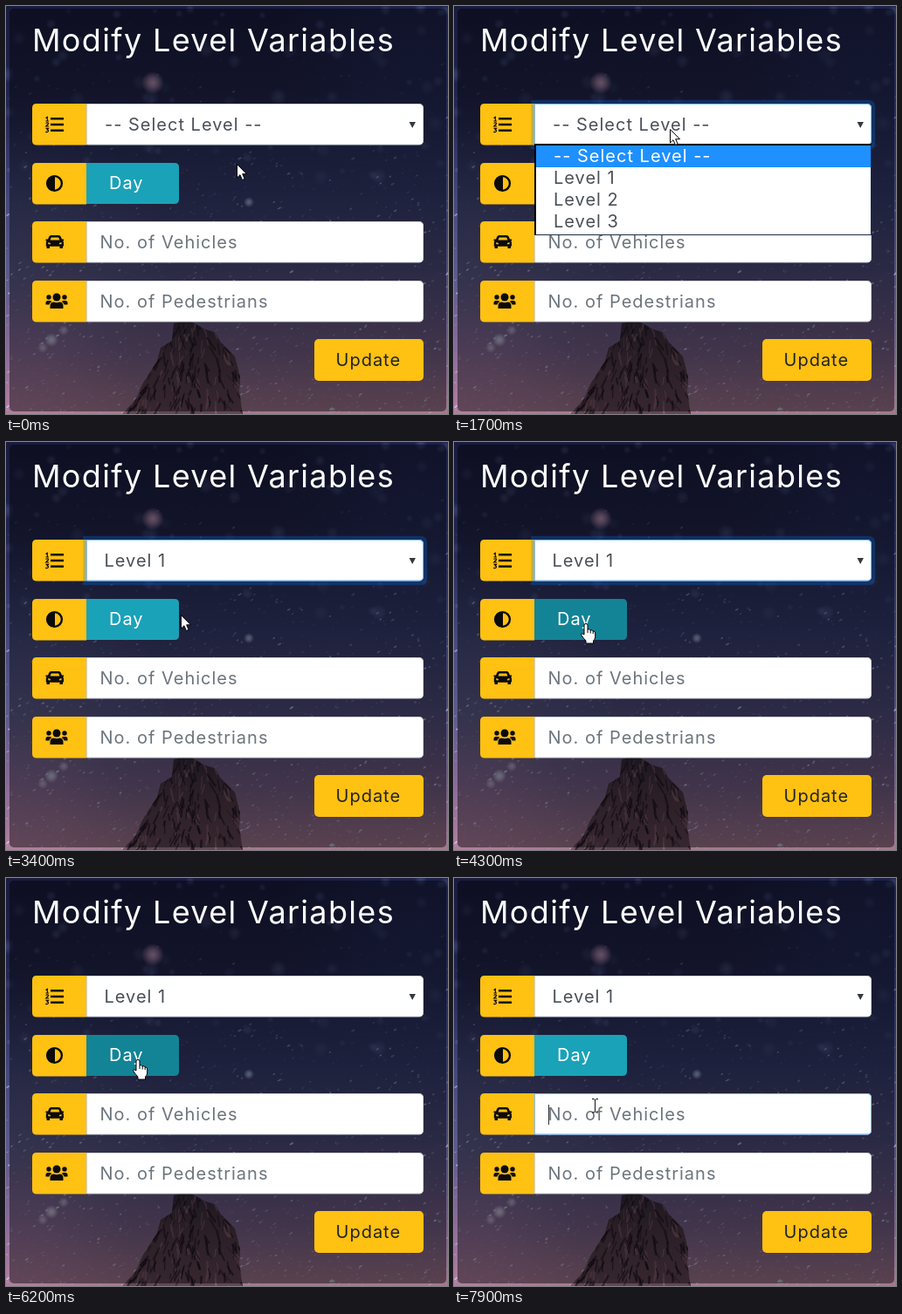
Write an HTML page with a canvas that moves like this. It is 506x468 px and loops after 8 s.

```html
<!DOCTYPE html>
<html lang="en">
<head>
<meta charset="utf-8">
<title>Modify Level Variables</title>
<style>
@property --row { syntax: "<integer>"; inherits: true; initial-value: 0; }
html, body { margin: 0; width: 100%; height: 100%; overflow: hidden; background: #14162c; }
canvas, .layer { position: absolute; left: 0; top: 0; width: 506px; height: 468px; }
.layer, .menu { font: 20px Inter, "Open Sans", sans-serif; letter-spacing: 1px; }
text { white-space: pre; }
.title { font-size: 36px; letter-spacing: 1.35px; fill: #fff; }
.hint { fill: #6c757d; }
.value { fill: #495057; }
.amber { fill: #ffc112; }
.field { fill: #fff; stroke: #ced4da; }

.glow, .blank, .chosen, .menu, .toggle, .day, .night, .focus,
.arrow, .hand, .beam { animation: 8s step-end infinite; }

.glow { animation-name: glow; }
.blank { animation-name: blank; }
.chosen { animation-name: chosen; }
.toggle { animation-name: toggle; }
.day { animation-name: day; }
.night { animation-name: night; }
.focus { animation-name: focus; }
.arrow { animation-name: arrow; }
.hand { animation-name: hand; }
.beam { animation-name: beam; }

.menu {
  position: absolute; left: 92px; top: 158px; width: 384px; height: 102px;
  border: 1px solid #1c2c48; border-width: 2px 1px 1px 2px; border-color: #000 #1c2c48 #1c2c48 #000;
  width: 383px; background: #fff; color: #495057; line-height: 25px; animation-name: menu, row;
}
.list { position: absolute; left: 20px; top: 0; white-space: nowrap; }
.bar {
  position: absolute; left: 0; top: 0; width: 100%; height: 25px; overflow: hidden;
  background: #1e90ff; color: #fff; transform: translateY(calc(var(--row) * 25px));
}
.bar .list { transform: translateY(calc(var(--row) * -25px)); }
.pointer { animation: path 8s linear infinite; }

@keyframes glow { 0% { opacity: 0 } 15% { opacity: 1 } 58.75%, 100% { opacity: 0 } }
@keyframes blank { 0% { opacity: 1 } 40%, 100% { opacity: 0 } }
@keyframes chosen { 0% { opacity: 0 } 40%, 100% { opacity: 1 } }
@keyframes menu { 0% { opacity: 0 } 15% { opacity: 1 } 40%, 100% { opacity: 0 } }
@keyframes row { 0% { --row: 0 } 27.4% { --row: 1 } 29.8% { --row: 2 } 34.6%, 100% { --row: 1 } }
@keyframes toggle {
  0% { fill: #1aa2b8 } 43.2% { fill: #138496 } 58.75% { fill: #0062cc }
  77.5% { fill: #138496 } 93%, 100% { fill: #1aa2b8 }
}
@keyframes day { 0% { opacity: 1 } 58.75% { opacity: 0 } 77.5%, 100% { opacity: 1 } }
@keyframes night { 0% { opacity: 0 } 58.75% { opacity: 1 } 77.5%, 100% { opacity: 0 } }
@keyframes focus { 0% { opacity: 0 } 98%, 100% { opacity: 1 } }
@keyframes arrow { 0% { opacity: 1 } 43.2% { opacity: 0 } 93% { opacity: 1 } 95%, 100% { opacity: 0 } }
@keyframes hand { 0% { opacity: 0 } 43.2% { opacity: 1 } 93%, 100% { opacity: 0 } }
@keyframes beam { 0% { opacity: 0 } 95%, 100% { opacity: 1 } }
@keyframes path {
  0%, 2% { transform: translate(264px, 181px) }
  9% { transform: translate(250px, 145px) }
  12%, 23.75% { transform: translate(247px, 141px) }
  28.75% { transform: translate(225px, 200px) }
  31.25% { transform: translate(210px, 222px) }
  33.75% { transform: translate(203px, 212px) }
  37.5%, 42.5% { transform: translate(200px, 198px) }
  48.75%, 91.25% { transform: translate(151px, 208px) }
  96.25%, 100% { transform: translate(161px, 261px) }
}
</style>
</head>
<body>
<canvas width="506" height="468"></canvas>

<svg class="layer" viewBox="0 0 506 468">
  <text class="title" x="30" y="51.5">Modify Level Variables</text>

  <g class="amber">
    <path id="tab" d="M35 112H92V159.5H35Q30 159.5 30 154.500V117Q30 112 35 112Z"/>
    <use href="#tab" y="68"/>
    <use href="#tab" y="135"/>
    <use href="#tab" y="203"/>
    <rect x="353" y="382" width="125" height="48" rx="5"/>
  </g>
  <path id="box" class="field" d="M92.5 112.5H473Q477.5 112.5 477.5 117V154.5Q477.5 159 473 159H92.5Z"/>
  <use href="#box" y="135"/>
  <use href="#box" y="203"/>

  <g class="glow" fill="none">
    <path d="M90.5 110H474Q480 110 480 116V156Q480 162 474 162H90.5Z" stroke="#007bff" stroke-opacity=".25" stroke-width="4.5"/>
    <path d="M92.5 112.5H473Q477.5 112.5 477.5 117V154.5Q477.5 159 473 159H92.5Z" stroke="#80bdff"/>
  </g>
  <text class="value blank" x="113" y="143">-- Select Level --</text>
  <text class="value chosen" x="112.5" y="143">Level 1</text>
  <path d="M461.5 133H469L465.2 140Z" fill="#343a40"/>

  <path class="toggle" d="M92 180H193Q198 180 198 185V222Q198 227 193 227H92Z"/>
  <text class="day" x="118" y="210" fill="#fff">Day</text>
  <g class="night">
    <path d="M92.5 180.5H193Q197.5 180.5 197.5 185V222Q197.5 226.5 193 226.5H92.5Z" fill="none" stroke="#4d94dd" stroke-dasharray="1 1"/>
    <text x="123.5" y="210" fill="#fff">Night</text>
  </g>

  <text class="hint" x="107.5" y="278">No. of Vehicles</text>
  <text class="hint" x="107.5" y="345.5">No. of Pedestrians</text>
  <text x="377.5" y="412.5" fill="#212529">Update</text>
  <g class="focus" fill="none">
    <path d="M92.5 247.5H473Q477.5 247.5 477.5 252V289.5Q477.5 294 473 294H92.5Z" stroke="#80bdff"/>
    <path d="M108.5 260V283" stroke="#333"/>
  </g>

  <g fill="#0b0b0b">
    <path d="M51 128H66V130.6H51ZM51 134.7H66V137.3H51ZM51 141.4H66V144H51Z"/>
    <path d="M45.5 128.5L47.3 127.3V131.8M45.5 132H49M45.5 134.5Q48.5 132.8 48.5 135L45.8 138H49M45.5 140.3H48.5L47 142Q49 142.2 48.3 143.8Q47 145.4 45.3 144.2" fill="none" stroke="#0b0b0b" stroke-width="1.2"/>
    <circle cx="55.5" cy="203.5" r="8.4" fill="none" stroke="#0b0b0b" stroke-width="2.4"/>
    <path d="M56 195A8.5 8.5 0 0 0 56 212Z"/>
    <path fill-rule="evenodd" d="M51.5 263H60.5Q62 263 62.7 264.6L64 267.6H66V269.5H65Q66 270.3 66 271.5V275.5H65V278H61.5V275.8H50V278H46.5V275.5H45.8V271.5Q45.8 270.3 46.8 269.5H45.5V267.6H48L49.3 264.6Q50 263 51.5 263ZM51.8 265.5L50.6 268.6H61.4L60.2 265.5ZM48.3 271V273.3H51.3Q51 271.4 48.3 271ZM63.5 271V273.3H60.5Q60.8 271.4 63.5 271Z"/>
    <circle cx="58" cy="334" r="4.5"/>
    <circle cx="49" cy="334" r="2.7"/>
    <circle cx="67" cy="334" r="2.7"/>
    <path d="M50.5 347V344Q50.5 339.8 54.5 339.5Q58 341 61.5 339.5Q65.5 339.8 65.5 344V347ZM45.5 342.5V340.5Q45.5 338 48 338H50.5L52.5 339Q50 340.3 49.5 342.5ZM70.5 342.5V340.5Q70.5 338 68 338H65.5L63.5 339Q66 340.3 66.5 342.5Z"/>
  </g>
</svg>

<div class="menu">
  <div class="list">-- Select Level --<br>Level 1<br>Level 2<br>Level 3</div>
  <div class="bar"><div class="list">-- Select Level --<br>Level 1<br>Level 2<br>Level 3</div></div>
</div>

<svg class="layer" viewBox="0 0 506 468">
  <g class="pointer">
    <path class="arrow" d="M.5 .5V16L4 12.7L6.5 18.5L9.2 17.3L6.7 11.7H11.5Z" fill="#fff" stroke="#000"/>
    <g class="hand">
      <path d="M-2 1.5Q0 -1 2 1.5V7Q4.5 5.8 5.2 8Q7.5 7 8.2 9Q10.5 8.5 10.7 11V16Q10 19 8.5 20V23H0V20Q-3 17 -5.5 13Q-5.5 10.8 -2 13Z" fill="#fff" stroke="#000"/>
      <path d="M2 7V11M5.2 8V11.5M8.2 9V12" stroke="#000" fill="none"/>
    </g>
    <path class="beam" d="M-3 -7.5H-1L.5 -6.5L2 -7.5H4M.5 -6.5V7M-3 8H-1L.5 7L2 8H4" fill="none" stroke="#111"/>
  </g>
</svg>

<script>
const ctx = document.querySelector("canvas").getContext("2d");
let seed = 41;
const rand = () => (seed = (seed * 16807) % 2147483647) / 2147483647;

function fade(x0, y0, x1, y1, stops) {
  const g = ctx.createLinearGradient(x0, y0, x1, y1);
  stops.forEach(([at, color]) => g.addColorStop(at, color));
  return g;
}

function blob(x, y, r, rgb, alpha) {
  const g = ctx.createRadialGradient(x, y, 0, x, y, r);
  g.addColorStop(0, `rgba(${rgb},${alpha})`);
  g.addColorStop(0.45, `rgba(${rgb},${alpha * 0.65})`);
  g.addColorStop(1, `rgba(${rgb},0)`);
  ctx.fillStyle = g;
  ctx.fillRect(x - r, y - r, 2 * r, 2 * r);
}

function sky() {
  ctx.fillStyle = fade(0, 0, 0, 468, [
    [0, "#191b3f"], [0.2, "#20234a"], [0.45, "#353b6e"],
    [0.65, "#4e4c7c"], [0.85, "#765f88"], [1, "#a4788f"]
  ]);
  ctx.fillRect(0, 0, 506, 468);
  blob(20, 300, 170, "150,150,205", 0.2);
  blob(0, 468, 150, "205,140,190", 0.35);
  blob(470, 60, 160, "50,70,140", 0.2);
  // soft, out-of-focus lights above
  for (let i = 0; i < 90; i++) {
    blob(rand() * 506, rand() * 200, 3 + rand() * 7, "120,140,200", 0.1 + rand() * 0.2);
  }
  // short star trails, denser further down
  ctx.lineCap = "round";
  for (let i = 0; i < 1500; i++) {
    const x = rand() * 506, y = 468 * Math.sqrt(rand()), len = 0.5 + rand() * 2;
    const near = Math.min(1, y / 300);
    ctx.strokeStyle = `rgba(195,205,238,${(0.12 + 0.8 * rand() ** 2) * near})`;
    ctx.lineWidth = 0.6 + rand() ** 2 * 1.4;
    ctx.beginPath();
    ctx.moveTo(x, y);
    ctx.lineTo(x + len, y - len * 0.6);
    ctx.stroke();
  }
  blob(168, 88, 13, "225,175,215", 0.8);
  blob(278, 225, 6, "190,205,245", 0.8);
  blob(52, 383, 8, "220,220,245", 0.8);
  blob(66, 372, 6, "220,215,240", 0.6);
  blob(42, 392, 6, "220,215,240", 0.6);
}

function mountain() {
  const edge = [
    [133, 468], [148, 452], [156, 434], [165, 420], [173, 407], [177, 392],
    [190, 384], [192, 364], [209, 360], [228, 371], [239, 374], [246, 386],
    [262, 402], [268, 425], [267, 442], [271, 468]
  ];
  ctx.save();
  ctx.beginPath();
  edge.forEach(p => ctx.lineTo(...p));
  ctx.closePath();
  ctx.fillStyle = fade(0, 360, 0, 468, [[0, "#33283a"], [0.4, "#4d3845"], [1, "#644656"]]);
  ctx.fill();
  ctx.clip();
  for (let i = 0; i < 260; i++) {
    const x = 135 + rand() * 140, y = 360 + rand() * 108;
    const len = 4 + rand() * 11, lean = (x - 212) / 100 + rand() - 0.5;
    ctx.strokeStyle = i % 3 ? "rgba(24,15,28,.6)" : "rgba(165,115,130,.4)";
    ctx.lineWidth = 0.7 + rand() * 2;
    ctx.beginPath();
    ctx.moveTo(x, y);
    ctx.lineTo(x + lean * len, y + len);
    ctx.stroke();
  }
  ctx.restore();
}

sky();
mountain();
ctx.fillStyle = "rgba(0,0,0,.45)";
ctx.beginPath();
ctx.roundRect(4, 3, 500, 462, 5);
ctx.fill();
</script>
</body>
</html>
```
